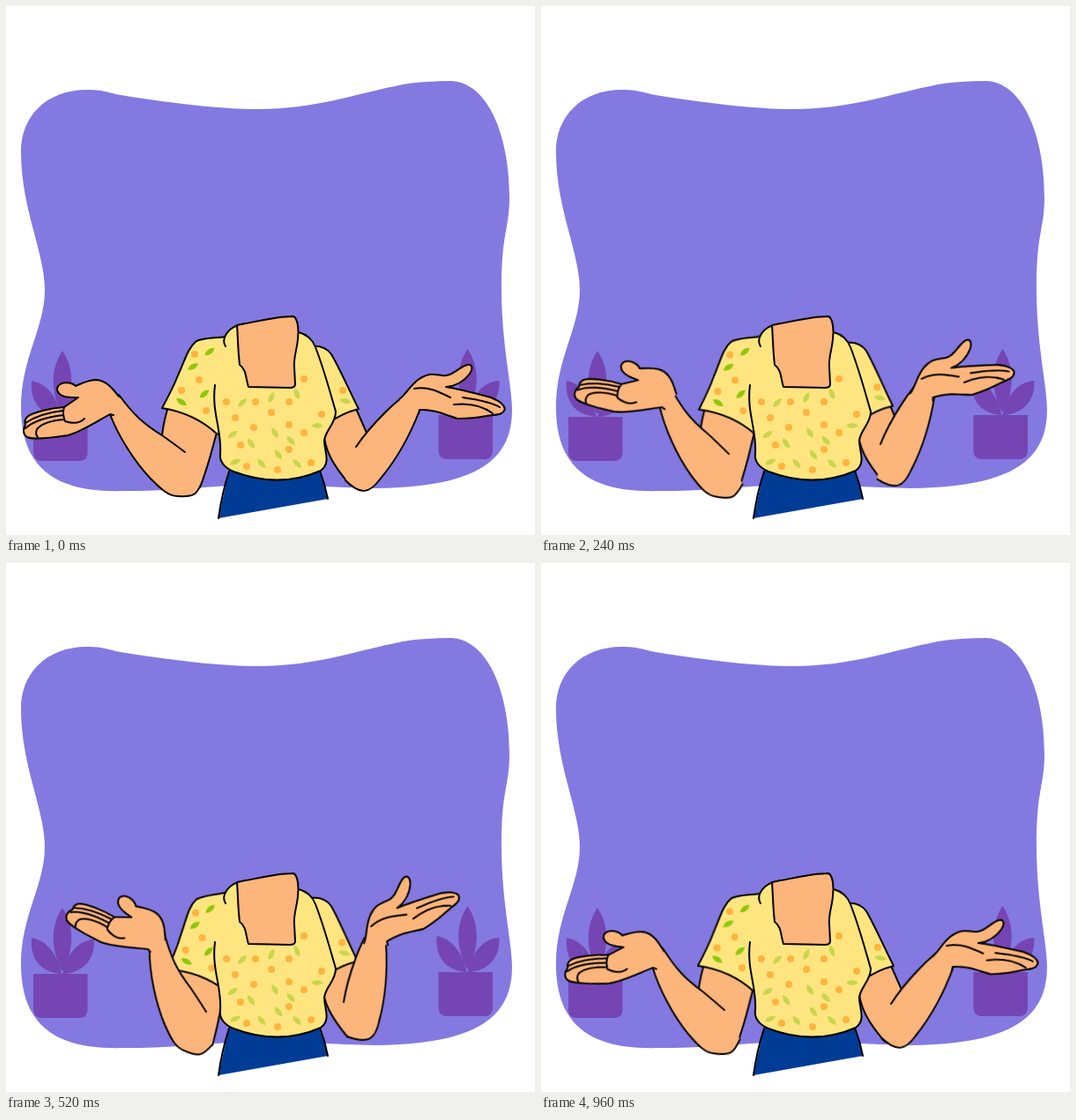
An HTML page without scripts that plays this animation: 600x600 px, repeating every 1 s.

```html
<!DOCTYPE html>
<html lang="en">
<head>
<meta charset="utf-8">
<title>Shrug</title>
<style>
  html, body { margin: 0; width: 100%; height: 100%; overflow: hidden; background: #fff; }
  svg { display: block; width: 100%; height: 100%; }

  .line, .skin, .shirt { stroke: #000; stroke-width: 2; stroke-linecap: round; stroke-linejoin: round; }
  .line { fill: none; }
  .skin, .flesh { fill: #fcb57a; }
  .shirt, .cloth { fill: #ffe580; }
  .plant { fill: #7545b4; }
  .dots { fill: #ffb43f; }
  .bright { fill: #8fc70a; }
  .pale { fill: #c8d64c; }

  /* Each part supplies its own poses: start, dip, rise, high, rest, drop, low */
  .part { animation: shrug 1s infinite; }
  @keyframes shrug {
    0%   { transform: translate(0, 0) rotate(0deg);
           animation-timing-function: linear(0 0% 25%, .45 25% 50%, .75 50% 75%, .93 75% 100%); }
    16%  { transform: var(--dip); animation-timing-function: steps(2); }
    24%  { transform: var(--rise);
           animation-timing-function: linear(0 0% 25%, .4 25% 50%, .7 50% 75%, .9 75% 100%); }
    40%  { transform: var(--high); animation-timing-function: steps(3); }
    52%  { transform: var(--rest); animation-timing-function: step-end; }
    84%  { transform: var(--drop); animation-timing-function: steps(3); }
    96%  { transform: var(--low); animation-timing-function: step-end; }
    100% { transform: translate(0, 0) rotate(0deg); }
  }

  .l-shoulder {
    transform-origin: 235px 385px;
    --dip:  translate(0, 0) rotate(-5deg);
    --rise: translate(0, 0) rotate(-1.7deg);
    --high: translate(0, 0) rotate(-2.3deg);
    --rest: translate(0, 0) rotate(-5deg);
    --drop: translate(0, 0) rotate(-3.5deg);
    --low:  translate(0, 0) rotate(-.8deg);
  }
  .l-forearm {
    transform-origin: 203px 506px;
    --dip:  translate(9px, 2px) rotate(-9.5deg);
    --rise: translate(10px, 2px) rotate(7.7deg);
    --high: translate(17px, 3px) rotate(20.8deg);
    --rest: translate(24px, 3px) rotate(20.8deg);
    --drop: translate(20px, 3px) rotate(15.5deg);
    --low:  translate(5px, 1px) rotate(4.2deg);
  }
  .l-hand {
    transform-origin: 118px 463px;
    --dip:  translate(2px, 16px) rotate(-8deg);
    --rise: translate(19px, -8px) rotate(21deg);
    --high: translate(35px, -26px) rotate(37deg);
    --rest: translate(43px, -25px) rotate(35deg);
    --drop: translate(34px, -19px) rotate(29deg);
    --low:  translate(9px, -4px) rotate(7deg);
  }
  .r-shoulder {
    transform-origin: 358px 390px;
    --dip:  translate(0, 1px) rotate(4.7deg);
    --rise: translate(0, -4px) rotate(.8deg);
    --high: translate(0, -6px) rotate(1deg);
    --rest: translate(0, -6px) rotate(1deg);
    --drop: translate(0, -3px) rotate(.3deg);
    --low:  translate(0, 0) rotate(0deg);
  }
  .r-forearm {
    transform-origin: 397px 500px;
    --dip:  translate(-7px, 3px) rotate(9.8deg);
    --rise: translate(-12px, -3px) rotate(-12.4deg);
    --high: translate(-14px, -3px) rotate(-25deg);
    --rest: translate(-14px, -2px) rotate(-25deg);
    --drop: translate(-9px, -1px) rotate(-16deg);
    --low:  translate(0, 0) rotate(-1.3deg);
  }
  .r-hand {
    transform-origin: 469px 460px;
    --dip:  translate(-1px, 16px) rotate(10.6deg);
    --rise: translate(-24px, -14px) rotate(-17deg);
    --high: translate(-36px, -29px) rotate(-32deg);
    --rest: translate(-36px, -29px) rotate(-32deg);
    --drop: translate(-23px, -17px) rotate(-20deg);
    --low:  translate(-2px, 0) rotate(-2deg);
  }
</style>
</head>
<body>
<svg viewBox="0 0 600 600">
  <defs>
    <circle id="dot" r="4"/>
    <path id="leaf" d="M-7 0Q0-6 7 0Q0 6-7 0Z"/>
    <g id="pot">
      <path d="M31 466H92.500V506Q92.500 516 82.500 516H41Q31 516 31 506Z"/>
      <path d="M64 391C77 410 78 436 65 462H63C50 436 51 410 64 391Z"/>
      <path d="M29 425C46 428 58 443 63 466C38 464 27 448 29 425Z"/>
      <path d="M100 427C82 428 69 443 64 466C88 465 101 449 100 427Z"/>
    </g>
  </defs>

  <path fill="#8479e1" d="M17 165C17 126 45 95 92 95C110 95 114 98 130 101C180 109 240 117 285 117C350 117 395 100 450 89C468 86 486 85 505 85C548 87 571 150 571 216C571 254 562 255 562 320C562 385 574 430 574 458C574 524 520 545 420 547C365 546 320 542 280 543C235 544 190 550 135 550C70 552 17 535 17 455C17 400 44 365 44 322C44 280 17 230 17 165Z"/>
  <g class="plant">
    <use href="#pot"/>
    <use href="#pot" x="459.500" y="-2"/>
  </g>

  <!-- Left arm -->
  <g class="part l-shoulder">
    <path class="skin" d="M187 445Q179 468 177 487L190 530L220 546C230 520 233 505 239 484L236 445Z"/>
    <path class="shirt" d="M250 375C235 377 225 376 216 380C206 388 203 402 195 419C190 432 183 445 177 456C202 460 224 471 240 486"/>
    <g class="dots">
      <use href="#dot" x="214" y="395"/>
      <use href="#dot" x="219" y="424"/>
      <use href="#dot" x="199" y="436"/>
      <use href="#dot" x="227" y="459"/>
    </g>
    <g class="bright">
      <use href="#leaf" transform="translate(231 392) rotate(-38)"/>
      <use href="#leaf" transform="translate(212 409) rotate(-30)"/>
      <use href="#leaf" transform="translate(225 440) rotate(-40)"/>
      <use href="#leaf" transform="translate(199 449) rotate(32)"/>
    </g>
  </g>
  <g class="part l-forearm">
    <path class="flesh" d="M203 506C195 500 187 494 177 487C156 474 145 464 128 441L118 463C127 487 145 516 164 536C176 548 184 556 195 556C214 557 217 554 223 538Z"/>
    <path class="line" d="M203 506C195 500 187 494 177 487C156 474 145 464 128 441M118 463C127 487 145 516 164 536C176 548 184 556 195 556C214 557 217 554 223 538"/>
  </g>
  <g class="part l-hand">
    <path class="skin" d="M128 443C121 434 114 425 103 424C93 424 86 428 79 431C74 426 60 425 58 434C58 441 66 444 75 444L82 444L66 455C50 456 30 461 24 466C21 469 21 472 22 475C19 480 19 486 24 489C30 492 50 490 70 487C85 483 100 473 118 463L122 464"/>
    <path class="line" d="M66 455C64 461 65 466 67 471C76 474 84 473 89 468M64 459C48 461 32 466 22 473M65 464C48 466 32 470 22 479M66 469C52 470 40 474 35 480Q33 486 36 489"/>
  </g>

  <!-- Right arm -->
  <g class="part r-shoulder">
    <path class="skin" d="M360 480C361 505 372 522 390 543L405 535L409 484L394 450L362 455Z"/>
    <path class="shirt" d="M346 386C356 385 364 388 369 395C379 412 391 440 400 457C388 460 378 464 366 473"/>
    <use class="dots" href="#dot" x="382" y="436"/>
    <use class="pale" href="#leaf" transform="translate(385 448) rotate(12)"/>
  </g>
  <g class="part r-forearm">
    <path class="flesh" d="M397 500C405 488 416 475 430 461C438 453 444 448 449 444L469 459C455 495 440 518 424 537C412 553 402 555 385 538Z"/>
    <path class="line" d="M397 500C405 488 416 475 430 461C438 453 444 448 449 444M469 459C455 495 440 518 424 537C412 553 402 555 385 538"/>
  </g>
  <g class="part r-hand">
    <path class="skin" d="M446 446C455 440 462 422 480 418C488 417 494 420 499 419C508 418 515 409 523 407C529 406 530 411 526 417C520 425 512 431 499 432C512 434 535 440 550 444C560 448 568 454 565 459C562 465 553 463 545 465C535 467 522 468 512 468C497 463 484 457 469 458L468 462"/>
    <path class="line" d="M463 434C478 431 490 437 504 444M508 452C525 450 541 454 552 462M518 444C532 446 550 449 560 455"/>
  </g>

  <!-- Body -->
  <path fill="#003c96" d="M253 526L241 581L365 559L356 525Z"/>
  <path class="line" d="M253 528Q245 552 241 581M356 527Q362 543 365 559"/>
  <path class="cloth" d="M237 430L249 387C245 378 250 364 272 360L332 370C343 373 348 379 351 387C361 413 367 436 374 460C374 474 362 481 361 493C361 505 369 518 357 527C325 541 292 541 258 528C247 523 242 517 243 508C245 480 233 462 237 430Z"/>
  <path class="line" d="M249 386C244 378 250 363 272 360M332 370C343 373 348 379 351 387C361 413 367 436 374 460C374 474 362 481 361 493C361 505 369 518 357 527C325 541 292 541 258 528C247 523 242 517 243 508C245 480 233 462 237 430"/>
  <path class="skin" d="M262 362C285 358 305 352 326 352C332 355 332 370 331 378C330 390 326 398 327 410L328 429Q328 433 322 433L275 432C272 424 273 412 265 407C263 390 263 376 262 362Z"/>
  <g class="dots">
    <use href="#dot" x="250" y="449"/>
    <use href="#dot" x="283" y="449"/>
    <use href="#dot" x="321" y="449"/>
    <use href="#dot" x="338" y="423"/>
    <use href="#dot" x="260" y="467"/>
    <use href="#dot" x="301" y="461"/>
    <use href="#dot" x="358" y="463"/>
    <use href="#dot" x="281" y="478"/>
    <use href="#dot" x="321" y="475"/>
    <use href="#dot" x="338" y="484"/>
    <use href="#dot" x="266" y="498"/>
    <use href="#dot" x="321" y="503"/>
    <use href="#dot" x="273" y="522"/>
    <use href="#dot" x="308" y="526"/>
    <use href="#dot" x="346" y="518"/>
  </g>
  <g class="pale">
    <use href="#leaf" transform="translate(268 450) rotate(-45)"/>
    <use href="#leaf" transform="translate(301 444) rotate(-65)"/>
    <use href="#leaf" transform="translate(330 440) rotate(70)"/>
    <use href="#leaf" transform="translate(257 486) rotate(-35)"/>
    <use href="#leaf" transform="translate(278 496) rotate(55)"/>
    <use href="#leaf" transform="translate(305 484) rotate(60)"/>
    <use href="#leaf" transform="translate(323 493) rotate(48)"/>
    <use href="#leaf" transform="translate(353 476)"/>
    <use href="#leaf" transform="translate(260 517) rotate(-25)"/>
    <use href="#leaf" transform="translate(290 519) rotate(50)"/>
    <use href="#leaf" transform="translate(309 509) rotate(52)"/>
    <use href="#leaf" transform="translate(330 519) rotate(45)"/>
  </g>
</svg>
</body>
</html>
```
